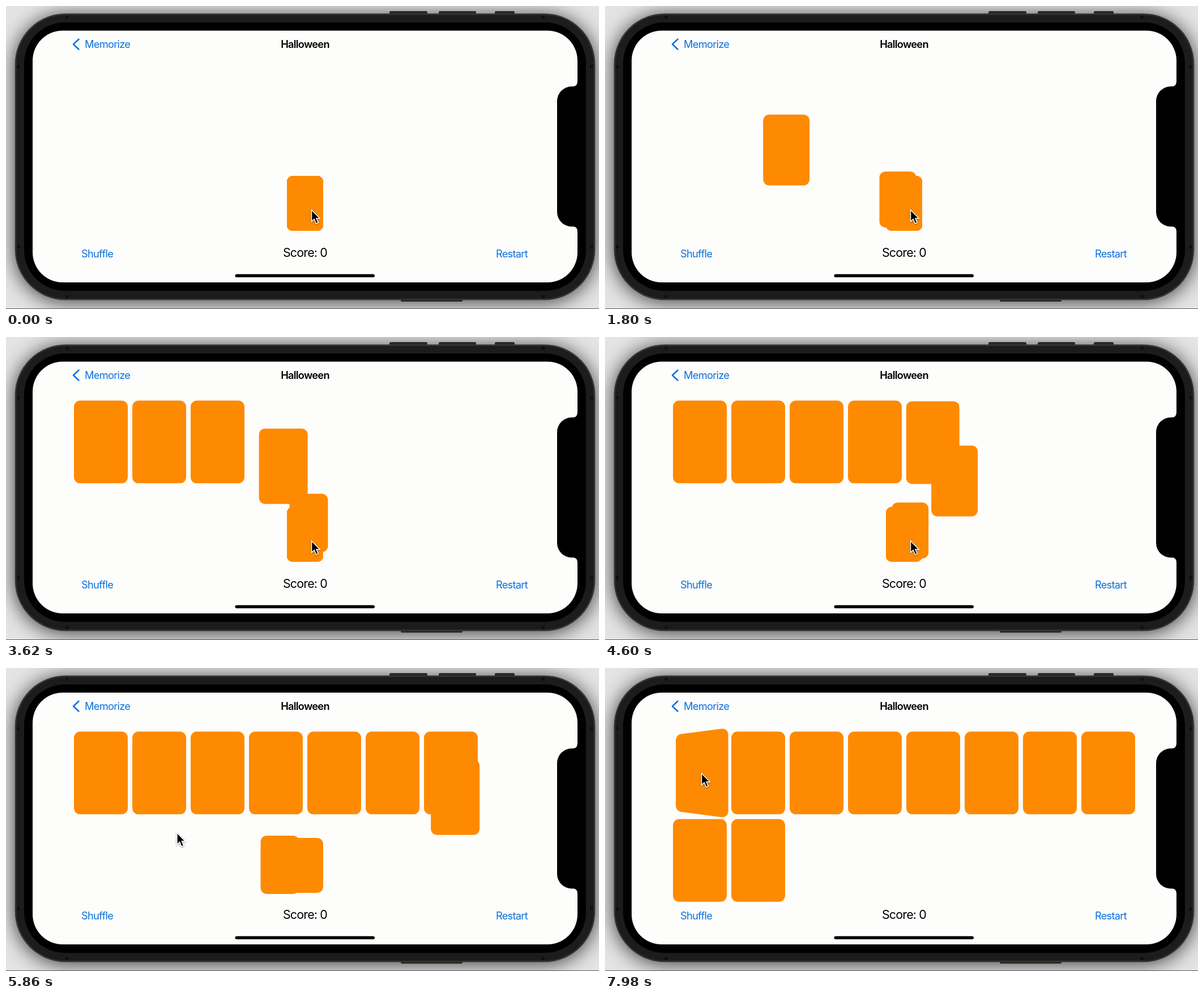
Recreate the animation shown at these times as an HTML page. Size 1047 by 535 pixels, loop 8 s.

```html
<!DOCTYPE html>
<html lang="en">
<head>
<meta charset="utf-8">
<title>Memorize</title>
<style>
  html, body { margin: 0; width: 100%; height: 100%; overflow: hidden; }
  #stage { position: relative; width: 1047px; height: 535px; overflow: hidden; background: #e4e4e4; }
  #shadow { position: absolute; left: 17px; top: 15px; width: 1022px; height: 503px;
    border-radius: 88px; box-shadow: 0 3px 34px 2px rgba(0, 0, 0, .72); }
  svg { position: absolute; left: 0; top: 0; }
  text { font-family: Inter, Roboto, sans-serif; font-size: 18.25px; letter-spacing: -.04em; }
  .link { fill: #0b70dc; }
  .mid { text-anchor: middle; }
  .card { position: absolute; left: 0; top: 0; border-radius: 10.5px; background: #fe8a02; }
  #cursor { filter: drop-shadow(0 1px 1.5px rgba(0, 0, 0, .4)); }
</style>
</head>
<body>
<div id="stage">
  <div id="shadow"></div>
  <svg width="1047" height="535">
    <path d="M0 534.5H1047" stroke="#5c5566"/>
    <g fill="#2b2a21">
      <rect x="677" y="9" width="67" height="9" rx="2"/>
      <rect x="764" y="9" width="66" height="9" rx="2"/>
      <rect x="863" y="9" width="35" height="9" rx="2"/>
      <rect x="697" y="513" width="109" height="9" rx="2"/>
    </g>
    <rect x="17" y="14.5" width="1022" height="503.5" rx="88" fill="#1c1c1c" stroke="#343434" stroke-width="2.5"/>
    <path d="M105 20h6M945 20h6M105 513h6M945 513h6M22 104v6M22 422v6M1034 104v6M1034 422v6"
      stroke="#101010" stroke-width="5"/>
    <rect x="32" y="29" width="992" height="474" rx="72"/>
    <rect x="47" y="43.5" width="962" height="444.5" rx="53" fill="#fdfdfc"/>
    <path d="M1010 132H1009C1009 139 1006 142 1001 142H999A26 26 0 0 0 973 168V363.500A26 26 0 0 0 999 389.500H1001C1006 389.500 1009 392 1009 399H1010Z"/>
    <path d="M128.500 58.500L119 67.500L128.500 76.500" fill="none" stroke="#0b70dc" stroke-width="2.5"
      stroke-linecap="round" stroke-linejoin="round"/>
    <text class="link" x="139" y="74">Memorize</text>
    <text class="mid" x="528" y="74" font-weight="600">Halloween</text>
    <text class="link" x="133" y="443.5">Shuffle</text>
    <text class="mid" x="528" y="443" style="font-size:21.5px">Score: 0</text>
    <text class="link mid" x="893" y="443.5">Restart</text>
    <rect x="404.5" y="473.5" width="246.500" height="5.5" rx="2.75"/>
  </svg>
  <div id="cards"></div>
  <svg width="1047" height="535">
    <path id="cursor" d="M0 0V20.500L4.700 16.300L8 24.300L11.800 22.700L8.500 14.900H14.700Z"
      stroke="#fff" stroke-width="1.5"/>
  </svg>
</div>
<script>
const LOOP = 8000, COUNT = 10, DEAL = 30;
const deck = { x: 528, y: 348.3, w: 64, h: 96.5 };
const mix = (a, b, p) => a + (b - a) * p;

// Ease-in-out: cubic-bezier(.42, 0, .58, 1)
function ease(x) {
  if (x <= 0) return 0;
  if (x >= 1) return 1;
  let lo = 0, hi = 1, s;
  for (let i = 0; i < 24; i++) {
    s = (lo + hi) / 2;
    const bx = 1.26 * s * (1 - s) ** 2 + 1.74 * s * s * (1 - s) + s ** 3;
    if (bx < x) lo = s; else hi = s;
  }
  return s * s * (3 - 2 * s);
}

// The screen refreshes three times per 140 ms, held for 20, 20 and 100 ms
function tick(ms) {
  const t = ms + 20, r = t % 140;
  return 3 * Math.floor(t / 140) + (r < 20 ? 0 : r < 40 ? 1 : 2);
}

const cards = Array.from({ length: COUNT }, (_, i) => {
  const el = document.createElement('div');
  el.className = 'card';
  document.getElementById('cards').append(el);
  return { el, x: 167.25 + 103 * (i % 8), y: i < 8 ? 185.3 : 339.8, start: 22.66 + 12 * i };
});
const cursor = document.getElementById('cursor');

function draw(ms) {
  const n = tick(ms);
  const flip = 180 * ease((n - 169.9) / 10.5);
  cards.forEach((c, i) => {
    const p = ease((n - c.start) / DEAL);
    const w = mix(deck.w, 94.5, p), h = mix(deck.h, 146, p);
    const x = mix(deck.x, c.x, p) - w / 2, y = mix(deck.y, c.y, p) - h / 2;
    const turn = i === 0 && flip ? ` perspective(146px) rotateY(${-flip}deg)` : '';
    c.el.style.width = w + 'px';
    c.el.style.height = h + 'px';
    c.el.style.transform = `translate(${x}px, ${y}px)${turn}`;
  });
  const s = ease((n - 114.3) / 20);
  cursor.setAttribute('transform',
    `translate(${mix(539.5, 170.5, s)} ${mix(360, 186, s ** 2.1)})`);
}

const begin = performance.now();
function loop() {
  draw((performance.now() - begin) % LOOP);
  requestAnimationFrame(loop);
}
loop();
</script>
</body>
</html>
```
